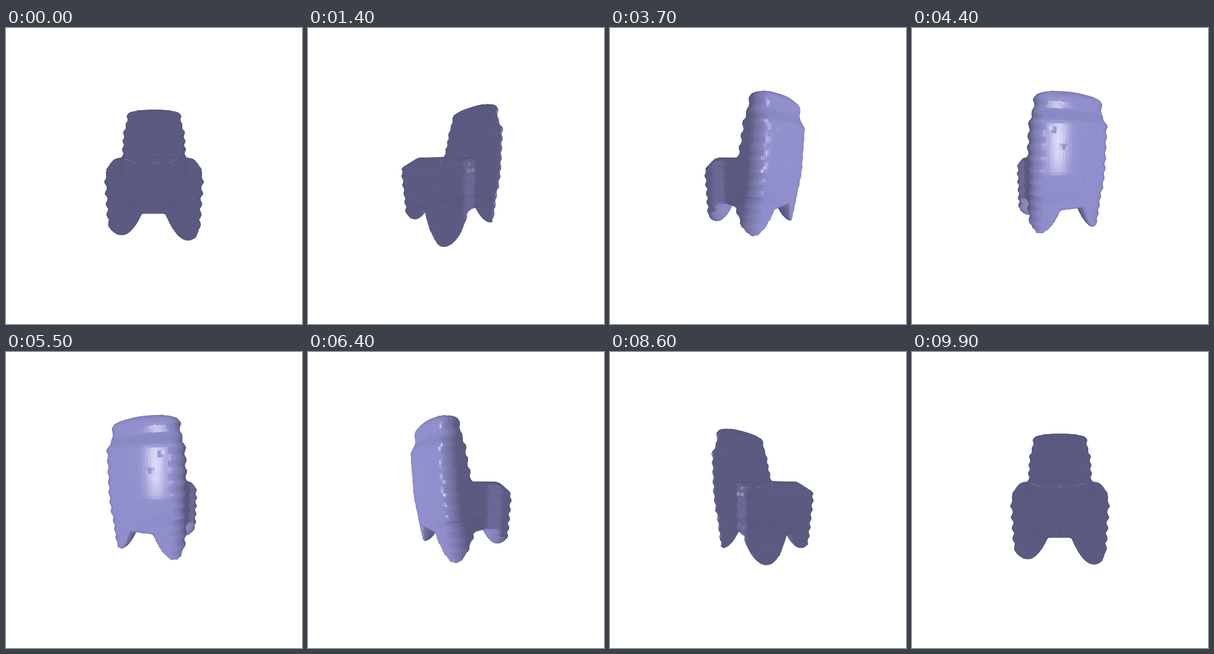
An HTML page with a canvas for the animation above (10000 ms loop, 512 by 512 pixels).

```html
<!DOCTYPE html>
<html lang="en">
<head>
<meta charset="utf-8">
<title>Turning model</title>
<style>
html, body { margin: 0; width: 100%; height: 100%; overflow: hidden; background: #fff; }
canvas { display: block; width: 512px; height: 512px; }
</style>
</head>
<body>
<canvas id="stage" width="512" height="512"></canvas>
<script>
const ctx = document.getElementById('stage').getContext('2d');
const STEP_MS = 100, STEPS = 100;
const CENTER = 256, DIST = 270, PITCH = 0.13;
const DARK = [90, 89, 128], GAIN = [55, 54, 77], SHINE = [75, 76, 45];

const clamp = (v, a, b) => Math.min(b, Math.max(a, v));

// Piecewise linear curve through [position, value] pairs
function curve(points) {
  return p => {
    if (p <= points[0][0]) return points[0][1];
    for (let i = 1; i < points.length; i++) {
      const [a, u] = points[i - 1], [b, v] = points[i];
      if (p <= b) return u + (v - u) * (p - a) / (b - a);
    }
    return points[points.length - 1][1];
  };
}

// Shape of the solid; y points down, z points to the rear
const frontZ = curve([[-118, -53], [-111, -59], [-103, -60], [-94, -58], [-78, -67],
  [-40, -65], [-10, -64], [40, -56], [82, -48]]);
const tallBack = curve([[-118, -28], [-60, -18], [-30, -10]]);
const halfWidth = curve([[-118, 47], [-104, 50], [-94, 51], [-80, 56], [-30, 58]]);
const lowBack = curve([[-12, 75], [10, 74], [82, 69]]);
const legs = [[46, -39], [46, 57]];
const dents = [[36, -66, 8], [18, -46, 6], [30, -52, 6]];

function slab(x, z, w, z0, z1, r) {
  r = Math.min(r, (z1 - z0) / 2);
  const qx = Math.abs(x) - w + r;
  const qz = Math.abs(z - (z0 + z1) / 2) - (z1 - z0) / 2 + r;
  return Math.min(Math.max(qx, qz), 0) + Math.hypot(Math.max(qx, 0), Math.max(qz, 0)) - r;
}

function solid(x, y, z) {
  const ax = Math.abs(x);
  const w = halfWidth(y);
  const z0 = frontZ(y) + x * x * 0.0033;
  const edge = clamp((ax - w * 0.75) / 12, 0, 1);
  const ripple = 2 * edge * Math.cos(y * Math.PI * 2 / 15.5);

  const lid = -118 + x * x * 0.002;
  const tall = Math.max(slab(x, z, w, z0, tallBack(y), 13) - ripple, lid - y, y - 20);

  const roof = -31 + Math.max(0, z - 44) * 0.55 + Math.max(0, ax - 56) * 1.1;
  let floor = 41;
  for (const [lx, lz] of legs) {
    const d2 = (ax - lx) ** 2 + (z - lz) ** 2;
    floor = Math.max(floor, 80 + x * z * 0.0013 - d2 * 0.04);
  }
  const lowWidth = w + 7 * clamp((z - 15) / 25, 0, 1);
  const low = Math.max(slab(x, z, lowWidth, z0, lowBack(y), 17) - ripple,
    roof - y, (y - floor) * 0.7);

  let d = Math.min(tall, low);
  for (const [dx, dy, r] of dents) {
    d = Math.max(d, r - Math.hypot((ax - dx) * 0.7, (y - dy) * 1.2, (z + 68) * 1.3));
  }
  return d;
}

function normalAt(x, y, z) {
  const e = 3;
  const n = [
    solid(x + e, y, z) - solid(x - e, y, z),
    solid(x, y + e, z) - solid(x, y - e, z),
    solid(x, y, z + e) - solid(x, y, z - e)
  ];
  const len = Math.hypot(...n) || 1;
  return n.map(v => v / len);
}

// Surface net over a regular lattice
function buildMesh() {
  const cell = 4, low = [-78, -128, -78], size = [40, 57, 42];
  const stride = [1, size[0], size[0] * size[1]];
  const total = stride[2] * size[2];
  const value = new Float32Array(total);
  const place = id => [id % size[0], Math.floor(id / stride[1]) % size[1], Math.floor(id / stride[2])];
  for (let id = 0; id < total; id++) {
    value[id] = solid(...place(id).map((v, a) => low[a] + v * cell));
  }

  const points = [], index = new Int32Array(total).fill(-1);
  for (let id = 0; id < total; id++) {
    const at = place(id);
    if (at.some((v, a) => v >= size[a] - 1)) continue;
    const sum = [0, 0, 0];
    let hits = 0;
    for (let c = 0; c < 8; c++) {
      const bits = [c & 1, c >> 1 & 1, c >> 2];
      const p = id + bits[0] + bits[1] * stride[1] + bits[2] * stride[2];
      for (let a = 0; a < 3; a++) {
        if (bits[a]) continue;
        const u = value[p], v = value[p + stride[a]];
        if ((u < 0) === (v < 0)) continue;
        for (let b = 0; b < 3; b++) sum[b] += bits[b];
        sum[a] += u / (u - v);
        hits++;
      }
    }
    if (!hits) continue;
    index[id] = points.length;
    points.push(sum.map((s, a) => low[a] + (at[a] + s / hits) * cell));
  }

  const faces = [];
  for (let id = 0; id < total; id++) {
    const at = place(id);
    if (at.some((v, a) => v < 1 || v >= size[a] - 1)) continue;
    for (let a = 0; a < 3; a++) {
      if ((value[id] < 0) === (value[id + stride[a]] < 0)) continue;
      const b = stride[(a + 1) % 3], c = stride[(a + 2) % 3];
      const corners = [id, id - b, id - b - c, id - c].map(p => index[p]);
      const mid = [0, 1, 2].map(k => corners.reduce((s, p) => s + points[p][k], 0) / 4);
      faces.push({ corners, mid, normal: normalAt(...mid) });
    }
  }
  return { points, faces };
}

const mesh = buildMesh();
const slits = [
  [[-50, -30, 0], [-31, -22, 10]],
  [[-4, -23, 0], [5, -22, 0]],
  [[25, -23, 10], [40, -30, 0]]
];

// The light shines on the front, fixed to the solid
function shade(normal, toEye) {
  const light = Math.max(0, -normal[2]);
  let shine = 0;
  if (light > 0) {
    const half = [toEye[0], toEye[1], toEye[2] - 1];
    const dot = half.reduce((s, v, k) => s + v * normal[k], 0) / (Math.hypot(...half) || 1);
    shine = Math.max(0, dot) ** 150;
  }
  return `rgb(${DARK.map((v, k) => Math.round(v + GAIN[k] * light + SHINE[k] * shine))})`;
}

function draw(step) {
  const turn = step / (STEPS - 1) * Math.PI * 2;
  const c = Math.cos(turn), s = Math.sin(turn);
  const pc = Math.cos(PITCH), ps = Math.sin(PITCH);
  const eye = [s * pc, -ps, c * pc].map(v => v * DIST);
  const project = ([px, py, pz]) => {
    const x = px * c - pz * s, near = px * s + pz * c;
    const m = DIST / (DIST - near * pc + py * ps);
    return [CENTER + x * m, CENTER + (py * pc + near * ps) * m];
  };

  ctx.fillStyle = '#fff';
  ctx.fillRect(0, 0, 512, 512);
  ctx.lineWidth = 0.7;
  ctx.lineJoin = 'round';

  const flat = mesh.points.map(project);
  const seen = [];
  for (const { corners, mid, normal } of mesh.faces) {
    const ray = eye.map((v, k) => v - mid[k]);
    const far = Math.hypot(...ray);
    const toEye = ray.map(v => v / far);
    const facing = toEye.reduce((sum, v, k) => sum + v * normal[k], 0);
    if (facing > -0.3) seen.push({ corners, far, color: shade(normal, toEye) });
  }
  seen.sort((a, b) => b.far - a.far);
  for (const { corners, color } of seen) {
    ctx.beginPath();
    for (const p of corners) ctx.lineTo(flat[p][0], flat[p][1]);
    ctx.closePath();
    ctx.fillStyle = ctx.strokeStyle = color;
    ctx.fill();
    ctx.stroke();
  }

  if (c > 0.6) {
    ctx.strokeStyle = '#8482b2';
    for (const [a, b] of slits) {
      ctx.beginPath();
      ctx.moveTo(...project(a));
      ctx.lineTo(...project(b));
      ctx.stroke();
    }
  }
}

const start = performance.now();
let shown = -1;
function tick() {
  const step = Math.floor((performance.now() - start) / STEP_MS) % STEPS;
  if (step !== shown) draw(shown = step);
  requestAnimationFrame(tick);
}
tick();
</script>
</body>
</html>
```
